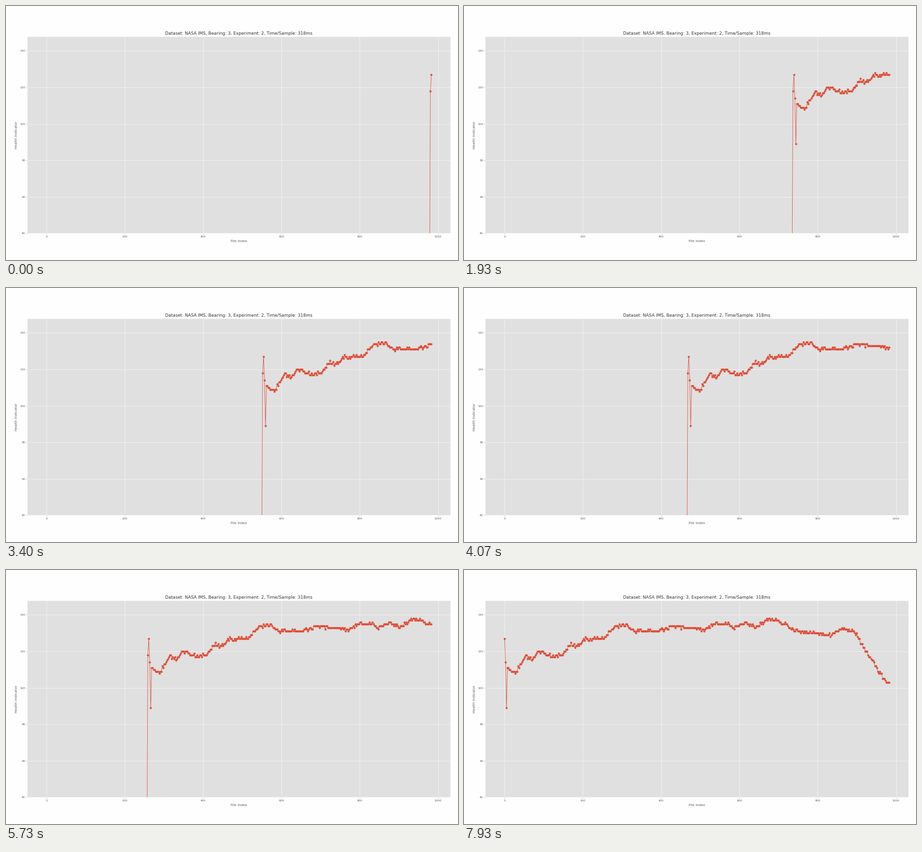
A matplotlib script for the animation above (8000 ms loop, 960x540 px).

```python
import numpy as np
import matplotlib.pyplot as plt
from matplotlib.animation import FuncAnimation

W, H, DPI = 960, 540, 60
PX = 72 / DPI                    # points per pixel
STEP_MS = 25
FRAMES = 320
REFRESH_MS = 200 / 3             # the plot refreshes 15 times a second
RATE = 3.405                     # samples per refresh
WINDOW = 400

RED, GREY, DARK = '#DE4B36', '#606060', '#333333'

# turning points of the health indicator: (sample, value)
TURNS = [
    (-1, 118), (0, 127), (1, 114), (2, 89), (3, 111), (11, 108),
    (22, 118), (28, 116), (36, 120), (49, 117.5), (60, 118), (68, 124),
    (73, 122.5), (84, 127), (103, 127), (115, 134), (128, 134), (132, 131.5),
    (157, 131), (178, 134), (207, 132), (217, 135), (232, 135.5), (236, 133),
    (250, 135.5), (260, 133), (272, 137.5), (282, 137), (303, 131),
    (339, 129), (350, 132.5), (362, 131), (396, 103), (399, 104),
]


def make_series():
    n = np.arange(-1, WINDOW)
    trend = np.interp(n, *zip(*TURNS))
    noise = np.random.default_rng(4).normal(0, 0.5, n.size)
    values = np.round(trend + np.where(n > 3, noise, 0))
    return np.concatenate([np.zeros(WINDOW - 2), values])


series = make_series()
index = np.linspace(0, 983, WINDOW)

plt.rcParams['font.family'] = 'DejaVu Sans'
fig = plt.figure(figsize=(W / DPI, H / DPI), dpi=DPI, facecolor='#FEFEFE')

left, right, top, bottom = 45.3, 944.3, 64.8, 483.3
ax = fig.add_axes([left / W, 1 - bottom / H, (right - left) / W, (bottom - top) / H],
                  facecolor='#E0E0E0')
ax.set_xlim(-49.15, 1032.15)
ax.set_ylim(40, 147.9)
ax.set_xticks(range(0, 1001, 200))
ax.set_yticks(range(40, 141, 20))
ax.set_axisbelow(True)
ax.grid(color='white', linewidth=0.56 * PX)
ax.tick_params(direction='out', length=2.2 * PX, width=0.55 * PX, pad=2.2 * PX,
               color=GREY, labelcolor=GREY, labelsize=6.2 * PX)
for spine in ax.spines.values():
    spine.set(color='white', linewidth=0.6 * PX)


def label(x, y, text, size, color, angle=0):
    fig.text(x / W, 1 - y / H, text, fontsize=size * PX, color=color, rotation=angle,
             rotation_mode='anchor', ha='center', va='baseline')


label(494.7, 61, 'Dataset: NASA IMS, Bearing: 3, Experiment: 2, Time/Sample: 318ms',
      9.07, DARK)
label(494.4, 501.9, 'File Index', 7.4, GREY)
label(24.3, 274, 'Health Indicator', 7.4, GREY, 90)

line, = ax.plot(index, series[:WINDOW], '-o', color=RED, linewidth=0.88 * PX,
                markersize=3.75 * PX, markeredgewidth=0.5 * PX)


def update(frame):
    refresh = int((frame + 0.5) * STEP_MS / REFRESH_MS + 0.1)
    shift = min(WINDOW - 1, round(RATE * refresh))
    line.set_ydata(series[shift:shift + WINDOW])
    return line,


anim = FuncAnimation(fig, update, frames=FRAMES, interval=STEP_MS,
                     repeat=True, repeat_delay=0, blit=False)
plt.show()
```
